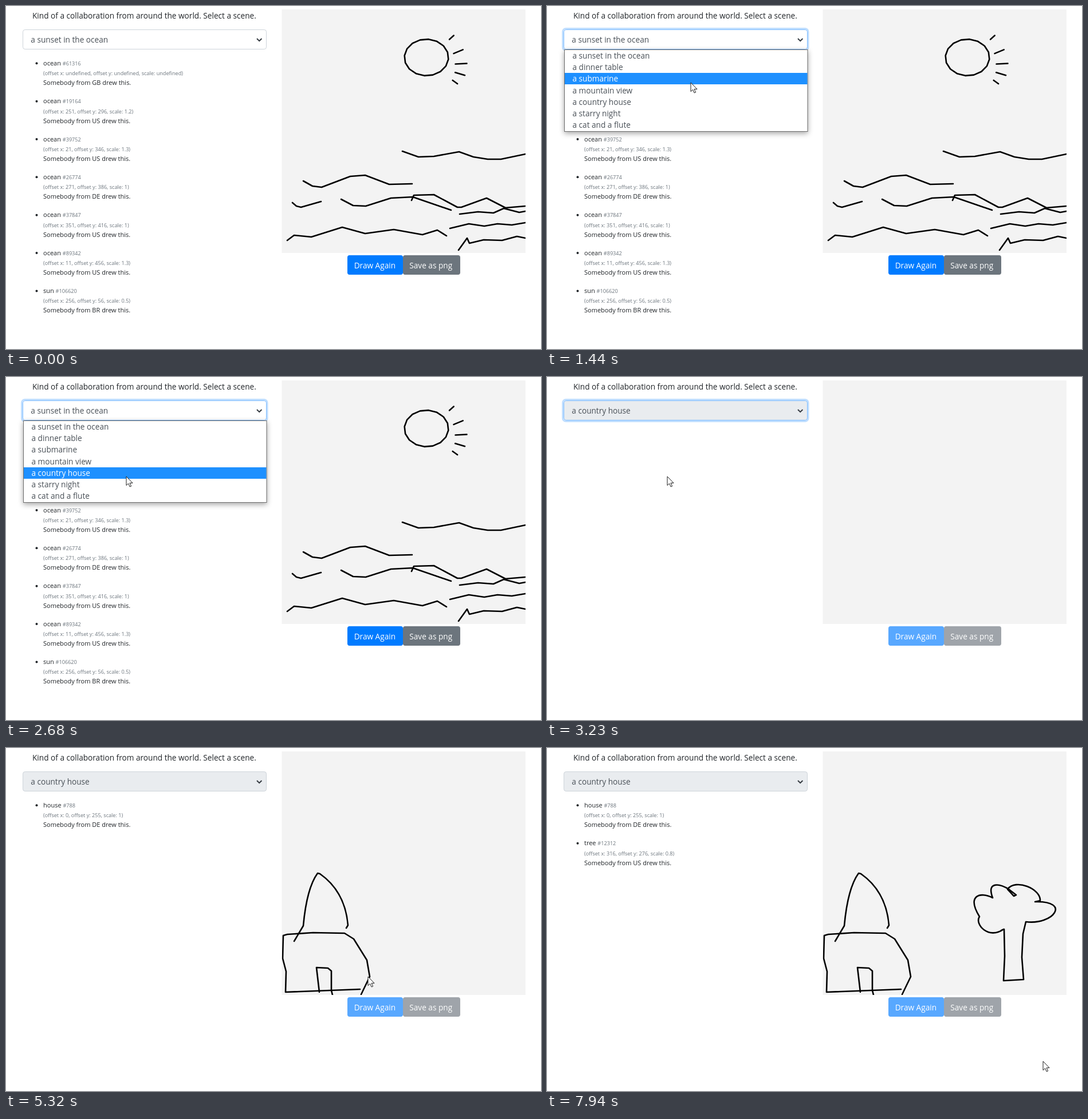
Write an HTML page that moves like this. It is 934 px wide and 600 px high and loops after 8000 ms.

```html
<!DOCTYPE html>
<html lang="en">
<head>
<meta charset="utf-8">
<title>Scene sketches</title>
<style>
  html, body { margin: 0; width: 100%; height: 100%; overflow: hidden; background: #fff; }
  svg { display: block; width: 100%; height: 100%; }
  text { font: 13.63px "Open Sans", "Noto Sans", sans-serif; fill: #212529; white-space: pre; }
  .field, .option { fill: #495057; }
  .option.on, .label { fill: #fff; }
  .item text { font-size: 11px; }
  .item .small { font-size: 9.15px; fill: #6c757d; }
  .ink { fill: none; stroke: #000; stroke-width: 2.6; stroke-linecap: round; stroke-linejoin: round; }
  .shade { filter: drop-shadow(0 3px 5px rgba(0, 0, 0, .35)); }
</style>
</head>
<body>
<svg viewBox="0 0 934 600" preserveAspectRatio="none">
  <clipPath id="paper"><rect x="481.5" y="6" width="425.5" height="426"/></clipPath>
  <text x="46" y="22">Kind of a collaboration from around the world. Select a scene.</text>

  <rect id="ring" x="27.5" y="39.5" width="428.5" height="38" rx="5.5" fill="none" stroke="#007bff" stroke-opacity=".25" stroke-width="3"/>
  <rect id="box" x="29.5" y="41.5" width="425" height="34" rx="3.7"/>
  <text id="value" class="field" x="43.3" y="64"></text>
  <path d="M438 57l4.2 4.2l4.2-4.2" fill="none" stroke="#343a40" stroke-width="2"/>

  <g id="seaList"></g>
  <g id="homeList"></g>

  <rect x="481.5" y="6" width="425.5" height="426" fill="#f3f3f3"/>
  <g class="ink" clip-path="url(#paper)">
    <g id="sea"></g>
    <g id="house"></g>
    <g id="tree"></g>
  </g>

  <g id="buttons">
    <rect x="596" y="436" width="97" height="34" rx="3.7" fill="#007bff"/>
    <rect x="693" y="436" width="100" height="34" rx="3.7" fill="#6c757d"/>
    <text class="label" x="607.7" y="459.4">Draw Again</text>
    <text class="label" x="704.3" y="459.4">Save as png</text>
  </g>

  <g id="panel">
    <rect class="shade" x="30.5" y="76.5" width="424.5" height="143" fill="#fff" stroke="#6b6b6b"/>
    <rect id="bar" x="31" width="423.5" height="20" fill="#1e90ff"/>
    <g id="options"></g>
  </g>
  <circle id="click" r="14" fill="#ffff78"/>
  <path id="cursor" d="M0 0V15.6L3.6 12.3L6.2 18L8.6 17L6.1 11.4H11Z" fill="#fff" stroke="#1c1c1c" stroke-linejoin="round"/>
</svg>

<script>
const LOOP = 8000, TICK = 77, ROW = 20.2, TOP = 77;
const $ = id => document.getElementById(id);
const range = n => [...Array(n).keys()];

const scenes = ["a sunset in the ocean", "a dinner table", "a submarine", "a mountain view",
  "a country house", "a starry night", "a cat and a flute"];

// name, id, offset x, offset y, scale, country
const u = "undefined";
const seaItems = [
  ["ocean", 61316, u, u, u, "GB"], ["ocean", 19164, 251, 296, 1.2, "US"],
  ["ocean", 39752, 21, 346, 1.3, "US"], ["ocean", 26774, 271, 386, 1, "DE"],
  ["ocean", 37847, 351, 416, 1, "US"], ["ocean", 89342, 11, 456, 1.3, "US"],
  ["sun", 106620, 256, 56, 0.5, "BR"]];
const homeItems = [["house", 788, 0, 255, 1, "DE"], ["tree", 12312, 316, 276, 0.8, "US"]];

// The sun is a 16-sided oval; its rays fan out along a bent column.
const sun = "M" + range(16).map(i => {
  const a = i * Math.PI / 8 + .1;
  return [734 + 38.5 * Math.cos(a), 90 + 32 * Math.sin(a)];
}).join("L") + "Z";
const rays = range(5).map(i => {
  const d = i - 2, a = (19.5 * d - 3) * Math.PI / 180, half = 10 - 1.2 * d * d;
  const x = 794.5 + 1.5 * d - 3.4 * d * d, y = 101 + 19.5 * d - 1.75 * d * d;
  const dx = half * Math.cos(a), dy = half * Math.sin(a);
  return `M${x - dx} ${y - dy}L${x + dx} ${y + dy}`;
});
const waves = [
  "M692 254L720 264 747 263 791 255 816 264 841 268H864L907 259",
  "M519 306L535 315 551 317 601 298 627 296 669 312 709 311",
  "M500 344L507 350 515 352 550 342",
  "M585 338L606 349 628 350 672 336 710 334 777 357",
  "M708 340L712 331 747 330 788 352H795L839 336 872 353 907 350",
  "M792 364L824 360 851 362 869 354 896 361 907 359",
  "M491 410L503 401 533 404 587 387 627 398 677 391 727 400 753 392 769 402",
  "M775 389L808 381 835 385 858 381 883 383 907 379",
  "M790 427L805 406 809 415 834 409 866 410 892 403 907 406"];
const house = [
  "M618 422L488 427 489 391 483 368 484 328 491 326 536 323 591 324 607 334 630 371 635 400 620 431",
  "M503 338L519 311Q525 245 544 219L548 220Q592 251 597 310L594 315",
  "M547 427L542 384 562 385 568 390V424L570 432"];
// Trunk, then the crown lobe by lobe.
const tree = ["M793 319L798 317 799 364 797 407 832 405 829 366 831 325 836 304" +
  "C885 310 915 267 852 269L861 267C862 246 818 228 804 247L815 259 819 257 806 247" +
  "C790 237 767 233 778 262C757 251 732 257 755 295C746 308 771 336 797 317"];

// start, end, x, y
const moves = [
  [70, 290, 309, 131], [440, 600, 288, 61], [1440, 1520, 214, 207],
  [1840, 1990, 211, 179], [2620, 2680, 210, 174], [3460, 4080, 630, 424],
  [5320, 5320, 632, 400], [5390, 5620, 645, 352], [7250, 7940, 866, 548]];
const ease = p => p * p * (3 - 2 * p);

// Share of a stepped change done at time t; its first step shows at once.
function share(t, start, end) {
  if (t < start) return 0;
  if (t >= end) return 1;
  const gaps = Math.round((end - start) / TICK);
  return (Math.floor((t - start) / (end - start) * gaps + 1e-6) + 1) / (gaps + 1);
}

function pointer(t) {
  let x = 878, y = 633;
  for (const [start, end, toX, toY] of moves) {
    const p = ease(share(t, start, end));
    x += (toX - x) * p;
    y += (toY - y) * p;
  }
  return [x, y];
}

function itemMarkup([name, id, x, y, scale, land], i) {
  return `<g class="item" transform="translate(0 ${i * 66.35})">
    <circle cx="53.5" cy="100.3" r="2" fill="#212529"/>
    <text x="65" y="104">${name} <tspan class="small">#${id}</tspan></text>
    <text class="small" x="65" y="121.2">(offset x: ${x}, offset y: ${y}, scale: ${scale})</text>
    <text x="65" y="138.3">Somebody from ${land} drew this.</text></g>`;
}

const fill = (id, list, markup) => [...($(id).innerHTML = list.map(markup).join(""), $(id).children)];
const pathMarkup = d => `<path d="${d}"/>`;

fill("seaList", seaItems, itemMarkup);
fill("sea", [sun, ...rays, ...waves], pathMarkup);
const [houseItem, treeItem] = fill("homeList", homeItems, itemMarkup);
const housePaths = fill("house", house, pathMarkup);
const treePaths = fill("tree", tree, pathMarkup);
const options = fill("options", scenes, (s, i) =>
  `<text class="option" x="44.5" y="${92 + i * ROW}">${s}</text>`);

const show = (el, on) => el.style.display = on ? "" : "none";
const set = (el, attrs) => { for (const k in attrs) el.setAttribute(k, attrs[k]); };
const within = (t, a, b) => t >= a && t < b;

// Reveals strokes one after another by length.
function reveal(paths, part) {
  const sizes = paths.map(p => p.getTotalLength());
  let left = part * sizes.reduce((a, b) => a + b);
  paths.forEach((p, i) => {
    show(p, left > 0);
    set(p, { "stroke-dasharray": left < sizes[i] ? `${left} 2000` : "none" });
    left -= sizes[i];
  });
}

function render(t) {
  const picked = t >= 3230, focus = within(t, 1130, 3310);
  const [x, y] = pointer(t);

  show($("ring"), focus);
  set($("box"), { fill: picked ? "#e9ecef" : "#fff", stroke: focus ? "#80bdff" : "#ced4da" });
  $("value").textContent = scenes[picked ? 4 : 0];
  set($("buttons"), { opacity: picked ? .65 : 1 });

  show($("seaList"), !picked);
  show($("sea"), !picked);
  show(houseItem, t >= 4920);
  show(treeItem, t >= 7170);
  reveal(housePaths, share(t, 4540, 4840));
  reveal(treePaths, share(t, 6320, 7090));

  const row = Math.max(0, Math.min(6, Math.floor((y - TOP) / ROW)));
  show($("panel"), within(t, 1060, 3230));
  set($("bar"), { y: Math.round(TOP + row * ROW) });
  options.forEach((o, i) => o.classList.toggle("on", i === row));

  show($("click"), within(t, 1060, 1210) || within(t, 3080, 3230));
  set($("click"), { cx: x - .5, cy: y });
  show($("cursor"), t >= 70);
  set($("cursor"), { transform: `translate(${x} ${y})` });
}

const began = performance.now();
function tick() {
  render((performance.now() - began) % LOOP);
  requestAnimationFrame(tick);
}
render(0);
requestAnimationFrame(tick);
</script>
</body>
</html>
```
